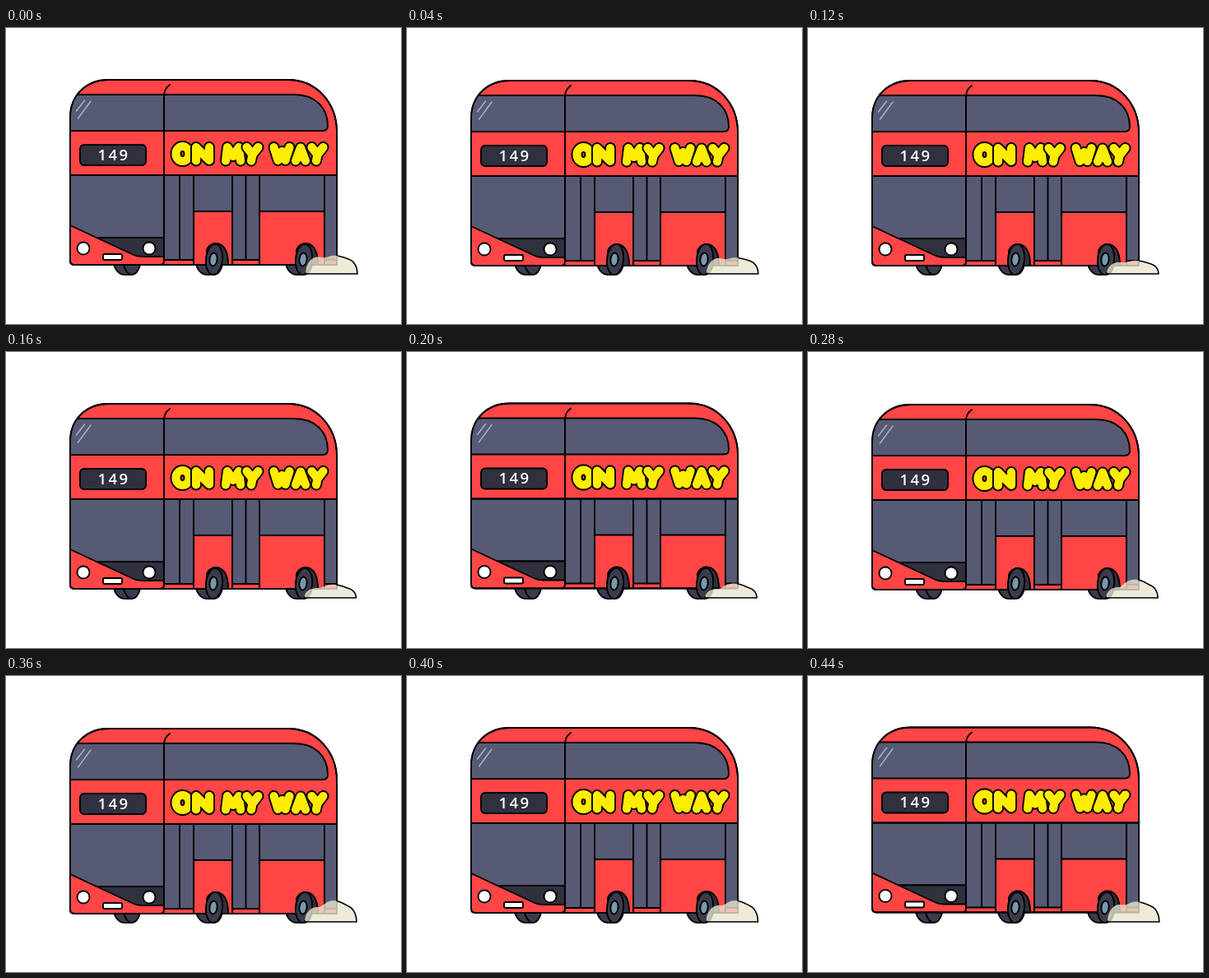
An HTML page with a canvas that plays this animation: 480x360 px, repeating every 0.48 s.

```html
<!DOCTYPE html>
<html lang="en">
<head>
<meta charset="utf-8">
<title>Bus</title>
<style>
html, body { margin: 0; width: 100%; height: 100%; overflow: hidden; background: #fff; }
canvas { display: block; }
</style>
</head>
<body>
<canvas id="stage" width="480" height="360"></canvas>
<script>
const ctx = document.getElementById('stage').getContext('2d');
const LOOP = 480, STEP = 40, GROUND = 299;
const RED = '#ff4545', GLASS = '#565a75', DARK = '#2f313f', TYRE = '#3a3c4e';
const INK = '#000', YELLOW = '#ffed00', LINE = 1.9;

const BODY = 'M83 288Q78 288 78 283V109C78 82 97 63 125 63H343C377 63 402 91 402 126V288Z';

// Centre lines of the bubble letters, each starting at x = 0.
const GLYPHS = {
  O: { width: 16, path: 'M0 153a8 9 0 1 1 16 0a8 9 0 1 1 -16 0Z' },
  N: { width: 18, path: 'M1 161.500V145L17 161V145' },
  M: { width: 18, path: 'M0 161.500L2 145L9 156L16 145L18 161.500' },
  Y: { width: 14, path: 'M0 145L7 154L14 145M7 154L5.500 161.500' },
  W: { width: 19, path: 'M0 145L5 161L10 150L14 161L19 145' },
  A: { width: 12, path: 'M0 161.500L6 145.500L12 161.500M3 157H9' }
};

// Dust puffs: centre, radius, mean height, swing and time of the highest point.
const PUFFS = [
  { x: 378, r: 15, height: 16, swing: 5, peak: 450 },
  { x: 398, r: 20, height: 21, swing: 5, peak: 380 },
  { x: 413, r: 13, height: 16, swing: 4, peak: 400 }
];

const wave = (t, peak, period = LOOP) => Math.cos((t - peak) / period * Math.PI * 2);

function paint(path, fill, stroke = INK, width = LINE) {
  if (fill) { ctx.fillStyle = fill; ctx.fill(path); }
  if (stroke) { ctx.strokeStyle = stroke; ctx.lineWidth = width; ctx.stroke(path); }
}

const shape = (d, ...style) => paint(new Path2D(d), ...style);

function oval(x, y, rx, ry, fill, tilt = 0) {
  const path = new Path2D();
  path.ellipse(x, y, rx, ry, tilt, 0, Math.PI * 2);
  paint(path, fill);
}

function box(x, y, w, h, r, fill) {
  const path = new Path2D();
  path.roundRect(x, y, w, h, r);
  paint(path, fill);
}

function drawTread(x) {
  shape(`M${x} 263H${x - 9}C${x - 26} 264 ${x - 26} 299 ${x - 8} 300H${x}Z`, TYRE);
  oval(x + 1, 281.5, 10.5, 18.5, TYRE);
}

function drawArch(x) {
  shape(`M${x - 8} 288V270C${x - 4} 258 ${x + 18} 256 ${x + 18} 288Z`, DARK);
}

function drawTyre(x) {
  oval(x + 1, 281.5, 10, 18.5, TYRE, 0.1);
  oval(x, 281.5, 4.6, 8, '#7899aa', 0.1);
}

function drawFront() {
  ctx.save();
  ctx.clip(new Path2D(BODY));
  shape('M76 81H192V125H76Z', GLASS);
  shape('M76 179H192V255H110L76 239Z', GLASS);
  shape('M110 255H192V278H165Q159 278 154 275.500Z', DARK);
  ctx.restore();

  shape('M85.500 101L95.500 88M87.500 110L103 89', null, '#b4b6c4', 1.3);
  for (const x of [94, 174]) oval(x, 268, 7.5, 7.5, '#fff');
  box(118, 275, 23, 7, 1.5, '#fff');
  box(90, 142, 80, 25, 5, DARK);

  ctx.fillStyle = '#fff';
  ctx.font = '600 18.5px "Open Sans", sans-serif';
  ctx.letterSpacing = '2.5px';
  ctx.fillText('149', 111.5, 160.5);
}

function drawLettering(text) {
  const gap = 7.5, space = 11.5;
  let x = 206.5;
  for (const char of text) {
    const glyph = GLYPHS[char];
    if (!glyph) { x += space; continue; }
    ctx.save();
    ctx.translate(x, 0);
    shape(glyph.path, null, INK, 14);
    shape(glyph.path, null, YELLOW, 10.2);
    ctx.restore();
    x += glyph.width + gap;
  }
}

function drawSide() {
  shape('M192 81H350C376 81 391 97 391 119Q391 125 385 125H192Z', GLASS);
  shape('M192 179H228V282H192ZM275 179H308V282H275ZM387 179H402V282H387Z', GLASS);
  shape('M228 179H275V223H228ZM308 179H387V223H308Z', GLASS);
  shape('M78 179H402M211 179V282M291.500 179V282');
  for (const x of [228, 275, 308, 387]) shape(`M${x} 179V288`);
  shape('M187 288Q192 288 192 283V85C192 76 194 73 199 69');
  drawLettering('ON MY WAY');
}

function drawBus(bounce) {
  [152, 252, 361].forEach(drawTread);
  ctx.save();
  ctx.translate(0, bounce);
  shape(BODY, RED);
  drawFront();
  drawSide();
  shape(BODY, null);
  [252, 361].forEach(drawArch);
  ctx.restore();
  [252, 361].forEach(drawTyre);
}

// Blends the half-ellipses of all puffs into one soft outline.
function dustPath(t) {
  const left = PUFFS[0].x - PUFFS[0].r;
  const right = PUFFS.at(-1).x + PUFFS.at(-1).r;
  const path = new Path2D();
  path.moveTo(left, GROUND);
  for (let x = left; x <= right; x += 0.5) {
    let sum = 0;
    for (const puff of PUFFS) {
      const dome = Math.sqrt(Math.max(0, 1 - ((x - puff.x) / puff.r) ** 2));
      sum += (dome * (puff.height + puff.swing * wave(t, puff.peak))) ** 6;
    }
    path.lineTo(x, GROUND - sum ** (1 / 6));
  }
  path.closePath();
  return path;
}

function drawDust(t) {
  ctx.save();
  ctx.translate(wave(t, 0), 0);
  const path = dustPath(t);
  paint(path, 'rgba(234, 229, 208, .8)', null);
  // The ink outline shows only outside the bus.
  ctx.beginPath();
  ctx.rect(402, 260, 40, 50);
  ctx.rect(350, GROUND - 1.5, 52, 10);
  ctx.clip();
  paint(path, null, INK, 1.6);
  ctx.restore();
}

function draw(now) {
  const t = Math.floor((now % LOOP) / STEP) * STEP;
  ctx.fillStyle = '#fff';
  ctx.fillRect(0, 0, 480, 360);
  ctx.lineJoin = ctx.lineCap = 'round';
  drawBus(0.5 + wave(t, 80, LOOP / 2));
  drawDust(t);
}

let start;
function tick(now) {
  start ??= now;
  draw(now - start);
  requestAnimationFrame(tick);
}
draw(0);
requestAnimationFrame(tick);
</script>
</body>
</html>
```
